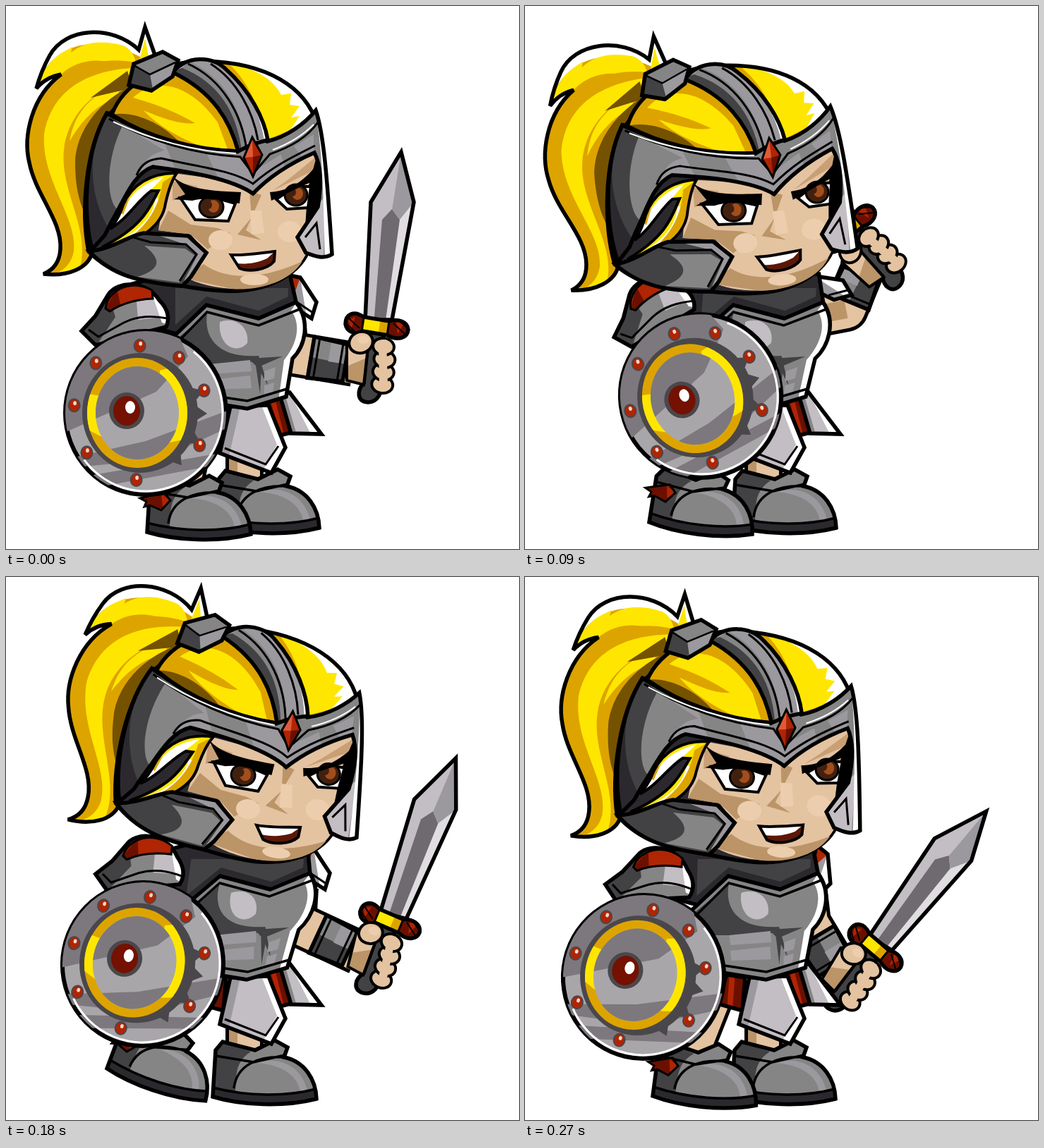
An HTML page with a canvas for the animation above (0.3 s loop, 727 by 770 pixels).

```html
<!DOCTYPE html>
<html lang="en">
<head>
<meta charset="utf-8">
<title>Sword swing</title>
<style>
html, body { margin: 0; width: 100%; height: 100%; overflow: hidden; background: #fff; }
canvas { display: block; }
</style>
</head>
<body>
<canvas id="stage" width="727" height="770"></canvas>
<script>
const ctx = document.getElementById('stage').getContext('2d');
const STEP = 30, POSES = 10;
const INK = '#000', WHITE = '#fff', YELLOW = '#ffe600', GOLD = '#dda400', BROWN = '#755200';
const COAL = '#2c292e', DARK = '#424143', GREY = '#858585', STEEL = '#9c999e', LIGHT = '#c3bec3';
const SKIN = '#e4c3a1', SHADE = '#bb9468', GLOW = '#ecceae', RED = '#b02503', WINE = '#6b1000';

// One row per pose: x, y, degrees (where the part turns).
const headTrack = [[349,213,0],[346,213,-3],[342,213,-5.6],[348,214,-4.4],[358,215,-1.5],
  [382,216,3.2],[403,217,7.5],[401,214,8.2],[390,215,6.8],[369,215,2.9]];
const swordTrack = [[525,453,0],[544,405,-16],[523,355,-33],[458,315,-48],[370,285,-62],
  [523,322,-45],[544,487,14],[512,541,37],[441,570,62],[497,525,31]];
const elbowTrack = [[398,492],[422,490],[447,456],[455,430],[446,392],
  [446,438],[408,490],[402,500],[392,510],[402,490]];
const shieldTrack = [[198,577,0],[215,570,-5],[231,563,-11],[249,553,-18],[264,543,-24],
  [231,552,-6.5],[194,549,11],[163,547,21],[138,548,29],[168,567,13]];
const shoulderTrack = [[177,413],[178,410],[180,407],[180,404],[180,402],
  [194,395],[204,386],[202,388],[198,393],[192,403]];
const footTrack = [[200,746,0],[192,743,1.5],[184,738,3],[176,732,5.5],[168,725,8],
  [155,710,13],[143,697,17],[151,706,14],[164,718,10],[181,736,4]];
const padTrack = [0, -18, -38, -48, -60, -35, 0, 15, 30, 28];
const leanTrack = [0, 4, 7, 11, 14, 16, 19, 17, 13, 4];
const rightFootTrack = [0, -1, -2, -3, -4, -4, -4, -5, -6, -4];

function at([x, y, deg = 0], draw) {
  ctx.save();
  ctx.translate(x, y);
  ctx.rotate(deg * Math.PI / 180);
  draw();
  ctx.restore();
}

const fill = (path, color) => { ctx.fillStyle = color; ctx.fill(new Path2D(path)); };

function line(path, width = 3, color = INK) {
  ctx.lineWidth = width;
  ctx.strokeStyle = color;
  ctx.stroke(new Path2D(path));
}

// Filled outline with details clipped to its inside.
function inked(path, color, details = [], width = 5.5) {
  fill(path, color);
  ctx.save();
  ctx.clip(new Path2D(path));
  for (const [tone, detail] of details) fill(detail, tone);
  ctx.restore();
  line(path, width);
}

function oval(x, y, rx, ry, color, width = 0, turn = 0) {
  ctx.beginPath();
  ctx.ellipse(x, y, rx, ry, turn, 0, Math.PI * 2);
  ctx.fillStyle = color;
  ctx.fill();
  if (width) { ctx.lineWidth = width; ctx.strokeStyle = INK; ctx.stroke(); }
}

function limb(points, width, color = SKIN) {
  const path = 'M' + points.map(p => p.slice(0, 2).join()).join('L');
  ctx.lineJoin = 'round';
  line(path, width + 10);
  line(path, width, color);
  ctx.lineJoin = 'miter';
}

function drawSword() {
  inked('M-16,-8L-8,-175L35,-246L53,-175L22,-8Z', LIGHT, [
    ['#e0dde0', 'M35,-246L22,-165L10,0L40,0L55,-175Z'],
    ['#6f6a70', 'M22,-165L33,-150L12,0L-4,0L8,-150Z'],
    [STEEL, 'M35,-246L22,-165L33,-150L53,-175Z']]);
  inked('M-10,5L10,8L8,80C8,95 2,109 -12,109C-28,108 -28,92 -18,82Z', DARK);
  inked('M-18,-12C-32,-22 -44,-16 -44,-2C-42,10 -28,14 -20,8L16,14C30,22 44,18 45,6C44,-6 30,-10 18,-6Z', WINE, [
    [YELLOW, 'M-18,-14L18,-8L15,16L-22,10Z'], [GOLD, 'M6,-10L18,-8L15,16L2,14Z'],
    [RED, 'M-40,-8L-30,-12L-36,6ZM28,-6L40,-4L30,12Z']]);
  line('M-18,-11L-21,9M18,-6L15,14', 3);
  line('M-40,-11L-24,4M-42,-2L-30,9M24,-3L40,12M34,-5L44,4', 2);
}

function drawHand() {
  inked('M-42,26L-24,14L-12,30L-18,84L-42,78Z', SKIN, [[SHADE, 'M-42,58L-14,46L-14,90L-42,80Z']], 4);
  for (let i = 3; i >= 0; i--)
    oval(13 - i * 1.6 - (i === 0 ? 3 : 0), 30 + i * 18, 15, 12, SKIN, 4, .15);
  fill('M3,25L14,20L16,84L4,88Z', SKIN);
  oval(-22, 24, 17, 15, SKIN, 4, -.4);
  oval(-18, 20, 8, 6, GLOW);
}

function drawArm(i) {
  const [x, y, deg] = swordTrack[i], a = deg * Math.PI / 180;
  const wrist = [x - 32 * Math.cos(a) - 55 * Math.sin(a), y - 32 * Math.sin(a) + 55 * Math.cos(a)];
  const elbow = elbowTrack[i], shoulder = [392 + leanTrack[i], 440];
  at(swordTrack[i], drawSword);
  limb([shoulder, elbow, wrist], 54);
  line(`M${shoulder}L${elbow}`, 26, SHADE);
  const tilt = Math.atan2(wrist[1] - elbow[1], wrist[0] - elbow[0]) * 180 / Math.PI;
  const mid = [elbow[0] + (wrist[0] - elbow[0]) * .62, elbow[1] + (wrist[1] - elbow[1]) * .62, tilt];
  at(mid, () => {
    inked('M-25,-29L25,-26L25,27L-25,30Z', GREY, [[DARK, 'M-25,0L25,2L25,32L-25,32Z'], [STEEL, 'M0,-30L16,-30L16,2L0,2Z']]);
    line('M-17,-28L-17,29M17,-27L17,28');
  });
  at(swordTrack[i], drawHand);
}

function drawBoot() {
  inked('M0,0L4,-66L14,-78L60,-66L88,-80L106,-70L101,-56C130,-50 146,-25 147,3C100,15 40,12 0,0Z', GREY, [
    [DARK, 'M0,0L4,-80L54,-64C26,-46 36,-22 30,8Z'],
    [STEEL, 'M60,-48C100,-60 128,-38 134,-8L124,-6C122,-28 100,-46 60,-48Z'],
    [COAL, 'M-4,-14C50,0 105,0 150,-12L150,20L-5,20Z']]);
  line('M0,-13C50,0 105,0 146,-11M4,-58L58,-49L102,-59M30,-12C34,-46 66,-58 101,-56', 3.5);
}

function drawSpur() {
  inked('M-10,-48L2,-51L24,-56L33,-45L20,-31L4,-38L-4,-36L-1,-43Z', WINE, [[RED, 'M20,-54L33,-45L22,-36Z']], 3);
}

function drawSkirt() {
  inked('M365,560L395,555L408,604L384,610Z', WINE, [[RED, 'M375,560L382,560L394,608L388,608Z']]);
  inked('M388,552L402,548L447,607L404,606Z', LIGHT, [[GREY, 'M386,552L395,550L412,608L402,608Z'], [WHITE, 'M402,548L447,607L432,607Z']]);
  inked('M280,563L312,568L308,615L276,606Z', WINE, [[RED, 'M290,560L298,560L294,615L286,615Z']]);
  inked('M228,552L285,566L272,612L236,620L205,606Z', LIGHT, [[GREY, 'M228,552L248,556L225,615L205,606Z'], [WHITE, 'M270,560L287,566L270,614L255,612Z']]);
  inked('M318,568L372,566L396,626L376,662L303,634Z', LIGHT, [
    [STEEL, 'M318,568L332,568L316,638L303,634Z'], [WHITE, 'M362,566L372,566L396,626L376,662L366,655L384,622Z']]);
  line('M310,627L368,650L386,624', 3);
}

function drawTorso() {
  inked('M165,398L230,380L402,380L412,424L360,446L285,428L245,466L205,455Z', COAL, [
    [DARK, 'M240,400L400,400L400,412L358,432L284,412L240,452Z']]);
  inked('M232,474L284,424L358,443L411,420C432,448 424,482 406,500L397,554L342,571L248,556L238,515Z', GREY, [
    [DARK, 'M240,474L285,436C280,470 300,500 358,496L372,540L352,504C310,512 270,505 240,510Z'],
    [LIGHT, 'M303,448C325,440 345,455 342,478C325,496 300,480 303,448Z'],
    [WHITE, 'M412,420C436,448 426,484 406,503L397,556L386,560L394,502C414,478 418,450 404,432Z'],
    [STEEL, 'M288,508L346,502L348,518L290,522ZM290,530L346,524L348,542L292,544Z'],
    [STEEL, 'M366,518L382,512L380,528L366,532ZM366,538L380,534L378,548L366,550Z'],
    [DARK, 'M344,500L392,497L362,510L360,550L354,510Z']]);
  line('M240,480L285,434L358,453L416,430M242,545L342,560L398,543', 3.5);
}

function drawPad() {
  inked('M-8,-24L12,-20L35,15L28,38L6,24Z', STEEL, [[WHITE, 'M12,-20L35,15L28,38L20,30Z'], [RED, 'M-12,-24L12,-20L4,2Z']]);
  line('M6,14L30,30');
}

function drawShoulder() {
  inked('M-32,-4C-18,-24 22,-24 40,4C52,16 56,28 50,42L-50,68L-70,48L-50,26Z', GREY, [
    [DARK, 'M-70,48L-32,-4L-22,28L-50,70Z'], [LIGHT, 'M8,6L34,0L46,28L10,32Z'], [WHITE, 'M28,-10L45,8L56,40L44,36Z']]);
  inked('M-36,16C-33,-10 0,-27 30,-10L31,2C8,3 -12,8 -30,20Z', RED, [[WINE, 'M-36,16L-20,-12L-14,14L-30,20Z']], 3);
  line('M-60,46L-46,56L-10,36C10,26 30,26 52,30');
}

function bands() {
  fill('M-125,-10L-70,-125L40,-125L60,-80L15,-30L-115,28Z', '#7c787d');
  fill('M-115,66L0,40L118,-4L118,20L20,66L-110,78ZM-98,92L100,58L88,76L-60,104Z', '#7c787d');
}

function drawShield() {
  oval(0, 0, 114, 116, '#a9a6aa', 6);
  ctx.save();
  ctx.clip();
  bands();
  ctx.restore();
  ctx.beginPath();
  ctx.ellipse(0, 0, 109, 111, 0, -.9, 2.5);
  ctx.lineWidth = 3;
  ctx.strokeStyle = WHITE;
  ctx.stroke();
  for (const a of [-.35, 0, .45, .9])
    at([-7, 0, a * 180 / Math.PI], () => fill('M78,-10L94,1L78,11Z', '#4a474b'));
  oval(-8, 0, 82, 85, '#4a474b');
  oval(-12, 0, 71, 78, GOLD);
  ctx.save();
  ctx.clip();
  fill('M-100,-30L-40,-20L-40,45L-100,15ZM20,-60L90,-80L90,30L20,45Z', YELLOW);
  ctx.restore();
  oval(-12, 0, 59, 66, '#a9a6aa');
  ctx.save();
  ctx.clip();
  bands();
  ctx.restore();
  oval(-27, -3, 25, 26, '#4a474b');
  oval(-27, -3, 19, 21, '#741100');
  oval(-22, -8, 7, 9, WHITE);
  for (const deg of [-95, -59, -21, 31, 98, 146, 186, 225]) {
    const a = deg * Math.PI / 180, r = 95 - 7 * Math.cos(a);
    const x = r * Math.cos(a), y = r * Math.sin(a);
    oval(x, y, 9, 10, '#4a474b');
    oval(x, y, 7, 8, RED);
    oval(x + 1, y - 3, 2.4, 3, '#f4d6cc');
  }
}

function drawTail() {
  inked('M212,72L197,30L188,62C150,26 84,30 62,70C52,88 47,102 43,117C54,104 66,99 78,97C36,128 24,185 33,222C42,268 80,305 77,345C76,362 68,374 53,380C88,384 116,372 122,350L150,150L185,112Z', GOLD, [
    [WHITE, 'M40,120C60,58 120,34 190,72L215,80L197,20L40,20Z'],
    [YELLOW, 'M44,114C58,78 72,70 94,58L92,66C112,50 136,48 166,56C176,60 182,70 184,80C140,72 110,82 78,97C62,97 55,104 44,114Z'],
    [GOLD, 'M78,97C105,72 145,72 172,92L120,100Z'],
    [YELLOW, 'M176,88C125,92 66,112 54,182C50,248 102,300 96,348C92,368 80,376 66,381L104,374C122,320 76,262 82,204C86,160 120,118 176,104Z'],
    [YELLOW, 'M160,112C125,124 98,146 90,192C110,158 130,140 160,128Z'],
    [BROWN, 'M185,110C150,124 102,162 98,220C98,258 104,284 120,310L140,180L190,125ZM172,92L120,130L180,116Z'],
    [YELLOW, 'M197,46L204,80L188,80Z']]);
}

function drawFace() {
  inked('M143,152C112,205 106,292 117,348C150,382 200,392 250,397C290,404 310,405 330,404C385,400 425,372 432,335L452,250L440,160Z', COAL);
  fill('M230,236L350,252L440,205L446,255L430,340C418,378 380,401 328,401C300,401 270,394 254,384L284,350L262,324L216,318Z', SKIN);
  fill('M230,290L262,310L300,315L318,322L286,345L262,324L216,318ZM252,386L280,366C310,388 360,390 420,362C400,395 350,404 320,401Z', SHADE);
  fill('M345,262L348,300L328,324L362,332L340,318L362,268Z', SHADE);
  fill('M236,248L272,256L262,268L236,276ZM378,262L400,246L438,215L438,232Z', '#c99f75');
  oval(304, 332, 17, 14, GLOW);
  oval(402, 320, 17, 15, GLOW);
  oval(352, 388, 20, 8, GLOW);
  fill('M346,290L362,290L366,322L348,324Z', GLOW);
  fill('M440,214L448,250L440,292L424,312L428,258Z', INK);
  inked('M247,272L268,303L315,305L325,280L290,270Z', WHITE, [], 4);
  oval(291, 285, 17, 15, '#42200f', 3);
  oval(294, 284, 8, 9, '#a24e1c');
  oval(287, 282, 5, 6, '#42200f');
  fill('M234,239C250,256 275,262 333,264L331,280C308,276 288,270 264,276L238,274L254,267Z', INK);
  inked('M383,274L398,288L428,286L432,256L410,256Z', WHITE, [], 4);
  oval(411, 268, 16, 15, '#42200f', 3);
  oval(413, 266, 8, 9, '#a24e1c');
  oval(406, 264, 5, 6, '#42200f');
  fill('M374,264C402,262 420,250 440,226L436,248C418,256 402,264 376,276Z', INK);
  inked('M319,353C340,354 362,350 381,348L380,362C370,374 345,378 331,372Z', '#5c1807', [
    [WHITE, 'M319,353L381,348L370,358C352,366 338,366 326,365Z']], 4);
}

function drawHelmet() {
  inked('M150,154C165,112 220,78 280,78C370,80 425,115 441,168L372,194L330,206C260,205 200,185 150,154Z', GOLD, [
    [YELLOW, 'M180,130C215,98 262,112 300,165L316,208L290,204C250,190 215,170 195,148C235,165 255,168 268,166C240,150 215,140 180,130Z'],
    [BROWN, 'M150,154C180,148 222,165 250,198L200,192Z'],
    [YELLOW, 'M318,84C350,84 400,110 430,140L430,165L368,190C362,150 345,110 318,84Z'],
    [GOLD, 'M310,84C345,110 362,150 370,190L356,170Z'],
    [WHITE, 'M332,80C400,88 440,130 442,168L400,180L416,156L404,158L416,142L402,140L404,124L390,126C380,106 360,94 332,84Z']]);
  inked('M143,152C200,185 260,204 328,206L349,182L370,192C400,185 425,165 439,148C450,180 455,240 462,352C450,360 436,354 425,350L413,328L442,285C448,250 446,225 437,208C405,222 375,240 350,266C320,245 260,235 208,228C180,238 168,275 150,305L140,325L122,345C108,292 112,205 143,152Z', GREY, [
    [DARK, 'M143,152L165,170C140,220 142,280 160,290L110,370L100,200Z'],
    [COAL, 'M132,180C112,230 128,290 146,315L112,370L105,220Z'],
    [STEEL, 'M170,172C230,200 280,212 330,213L350,235L436,182L436,206L350,264C310,242 260,234 206,228L190,240C195,215 210,208 225,205Z'],
    [GREY, 'M225,195L285,210L300,242L240,232ZM385,195L400,188L420,215L395,228Z'],
    [LIGHT, 'M440,285L413,328L425,350L450,358L452,270Z'],
    [WHITE, 'M439,152C446,190 450,240 452,360L466,358L456,180Z']]);
  line('M146,160C205,193 270,210 332,214L350,238L374,210C410,198 430,182 442,165', 3);
  line('M185,240C192,222 205,217 220,216C270,228 320,232 350,252C380,226 410,212 438,198M424,328L440,308L445,345', 3);
  line('M152,164C205,190 268,206 326,209M378,204C405,194 424,180 436,168', 2, WHITE);

  inked('M236,94C256,70 292,70 312,90C346,120 366,160 371,190L349,196L329,206C318,165 295,122 236,94Z', STEEL, [
    [DARK, 'M230,94L262,84C305,110 330,160 336,215L320,210Z'],
    [GREY, 'M258,78C310,100 336,150 342,205L334,206C328,150 300,108 250,88Z'],
    [WHITE, 'M318,98C346,122 362,160 366,192L374,190C368,150 345,112 318,90Z']]);
  line('M258,82C306,104 334,152 341,204M290,82C328,106 350,150 357,190', 3);
  inked('M174,112L181,82L222,65L244,77L236,100L206,120Z', DARK, [
    [GREY, 'M181,82L222,65L244,77L204,97Z'], [STEEL, 'M204,97L244,77L236,100L208,118Z']]);
  line('M181,84L204,97L240,80', 2.5);
  inked('M349,186L363,211L350,242L337,215Z', RED, [
    ['#df5a38', 'M349,186L350,214L337,215Z'], [WINE, 'M350,214L363,211L350,242Z']], 3);
}

function drawSideHair() {
  inked('M242,237C205,236 178,254 166,282C160,300 154,308 148,316C172,302 186,276 206,262L216,262C204,284 196,312 136,342C190,338 222,310 226,280C230,262 234,248 242,237Z', YELLOW, [
    [WHITE, 'M166,288C180,262 198,250 224,242L208,258L148,318ZM136,344C190,322 208,300 212,272L218,274C216,310 180,336 140,345Z'],
    [GOLD, 'M242,237L222,250C216,290 196,318 160,338L200,332L232,280ZM196,246L176,270L166,296L160,290Z']], 4);
  inked('M118,348C150,345 175,325 195,322L258,326L284,350L262,384L250,397C190,392 150,382 118,348Z', DARK, [
    [GREY, 'M196,340L254,344L268,354L246,392L186,384C215,375 225,362 196,340Z'],
    [STEEL, 'M215,325L258,326L284,350L262,384L252,390L272,352L254,338Z']]);
  line('M180,328L205,335L255,338L270,352L246,390', 3);
}

function drawHead() {
  ctx.translate(-349, -213);
  drawTail();
  drawFace();
  drawHelmet();
  drawSideHair();
}

function drawPose(i) {
  const lean = leanTrack[i];
  ctx.fillStyle = WHITE;
  ctx.fillRect(0, 0, 727, 770);
  ctx.lineJoin = 'miter';
  ctx.miterLimit = 4;
  drawArm(i);
  at([405 + lean, 405, padTrack[i]], drawPad);

  const foot = footTrack[i], a = foot[2] * Math.PI / 180;
  limb([[272, 590], [foot[0] + 52 + 66 * Math.sin(a), foot[1] - 62 + 50 * Math.sin(a)]], 44);
  limb([[338, 620], [338, 680]], 44);
  line('M322,630L322,675', 12, SHADE);
  at([297 + rightFootTrack[i], 737], drawBoot);
  at(foot, () => { drawBoot(); drawSpur(); });

  drawSkirt();
  ctx.save();
  ctx.transform(1, 0, -lean / 140, 1, lean / 140 * 565, 0);
  drawTorso();
  ctx.restore();
  at([...shoulderTrack[i], shieldTrack[i][2] * .9], drawShoulder);
  at(headTrack[i], drawHead);
  at(shieldTrack[i], drawShield);
}

function tick(now) {
  drawPose(Math.floor(now / STEP) % POSES);
  requestAnimationFrame(tick);
}
drawPose(0);
requestAnimationFrame(tick);
</script>
</body>
</html>
```
